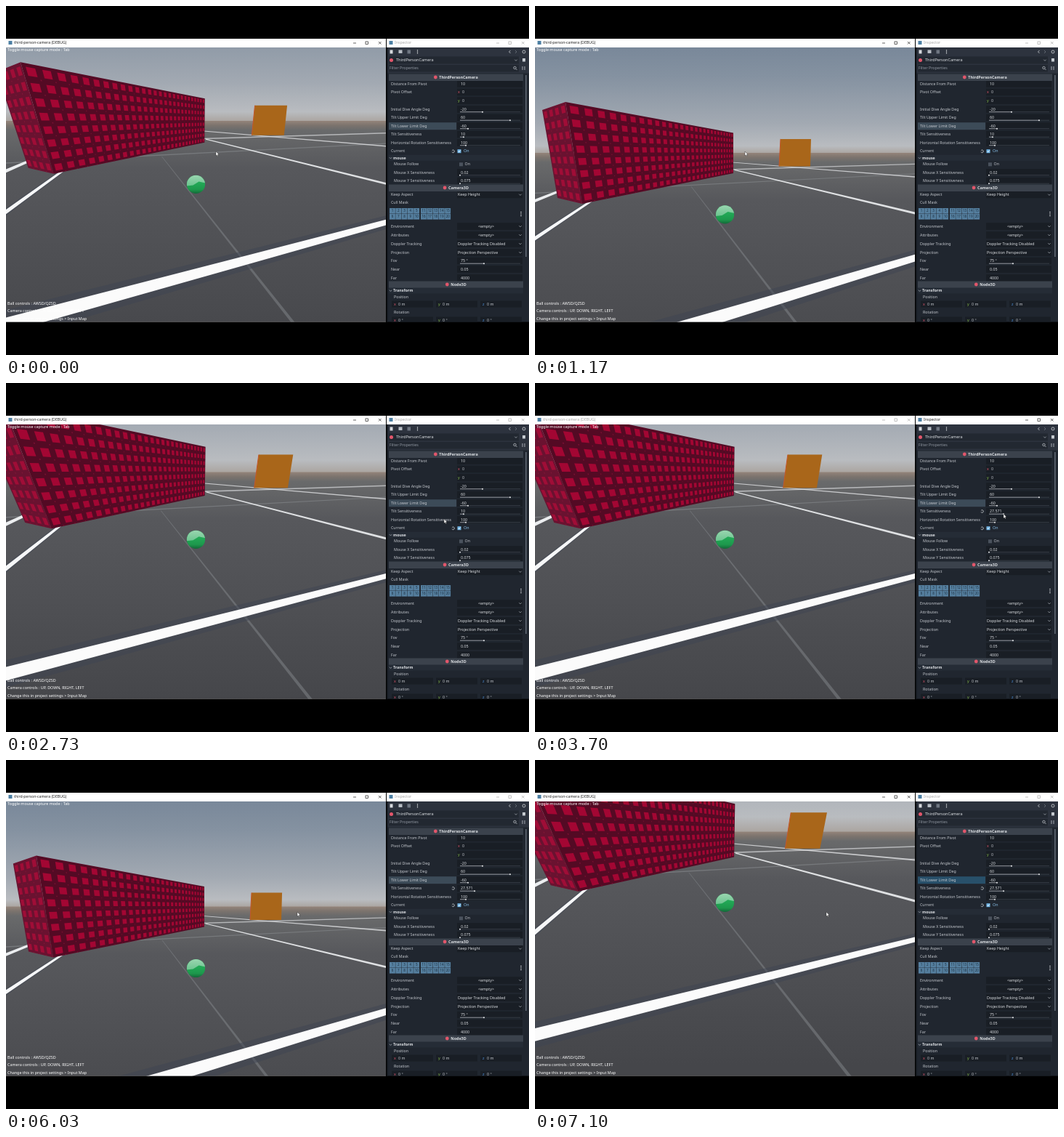
An HTML page with a canvas for the animation above (7.26 s loop, 720 by 480 pixels).

```html
<!DOCTYPE html>
<html>
<head>
<meta charset="utf-8">
<style>
html, body { margin: 0; width: 100%; height: 100%; overflow: hidden; background: #000; }
canvas { display: block; }
</style>
</head>
<body>
<canvas id="stage" width="720" height="480"></canvas>
<script>
const g = document.getElementById('stage').getContext('2d');
const LOOP = 7260, CX = 261.5, CY = 245.5, FOCAL = 245.7, RAD = Math.PI / 180;
const HORIZON = 9.8;          // downward pitch at tilt 0, degrees
const HIGH = 0, LOW = 20.9;   // tilts at which scene points were measured
let tilt = 0;

// [time, ...values] keys, linear in between
const TILT = [[400, 9.6], [930, -2], [1070, -2], [1730, 11.2], [2100, 16.6], [5600, 16.6],
  [6030, 0.15], [6300, -10], [6400, -10], [7080, 20.9]];
const MOUSE = [[2430, 290, 203], [2730, 604, 190], [3030, 629, 182], [3200, 629, 182],
  [3700, 646, 183], [5030, 646, 183], [5470, 402, 212]];
const SENS = [[3230, 10], [3700, 27.571]];

function track(keys, t) {
  if (t <= keys[0][0]) return keys[0].slice(1);
  for (let i = 1; i < keys.length; i++) {
    const a = keys[i - 1], b = keys[i];
    if (t < b[0]) {
      const k = (t - a[0]) / (b[0] - a[0]);
      return a.slice(1).map((v, j) => v + (b[j + 1] - v) * k);
    }
  }
  return keys[keys.length - 1].slice(1);
}

// Screen place of a point seen at (x, y) under tilt ref, for the current tilt
function view([x, y], ref = HIGH) {
  const a = (tilt - ref) * RAD, c = Math.cos(a), s = Math.sin(a), dy = CY - y;
  const k = FOCAL / (FOCAL * c - dy * s);
  return [CX + (x - CX) * k, CY - (dy * c + FOCAL * s) * k];
}
const elevation = e => CY - FOCAL * Math.tan((e + HORIZON + tilt) * RAD);

function trace(pts) {
  pts.forEach(([x, y], i) => i ? g.lineTo(x, y) : g.moveTo(x, y));
  g.closePath();
}
function poly(pts, color) {
  g.beginPath();
  trace(pts);
  g.fillStyle = color;
  g.fill();
}
function strip(ref, x1, y1, w1, x2, y2, w2, color) {
  poly([[x1, y1 - w1 / 2], [x2, y2 - w2 / 2], [x2, y2 + w2 / 2], [x1, y1 + w1 / 2]]
    .map(p => view(p, ref)), color);
}

// Perspective map from the unit square to a quad (clockwise from top left)
function square([a, b, c, d]) {
  const sx = a[0] - b[0] + c[0] - d[0], sy = a[1] - b[1] + c[1] - d[1];
  const x1 = b[0] - c[0], x2 = d[0] - c[0], y1 = b[1] - c[1], y2 = d[1] - c[1];
  const det = x1 * y2 - x2 * y1, p = (sx * y2 - x2 * sy) / det, q = (x1 * sy - sx * y1) / det;
  return (u, v) => {
    const w = p * u + q * v + 1;
    return [0, 1].map(i => ((b[i] - a[i] + p * b[i]) * u + (d[i] - a[i] + q * d[i]) * v + a[i]) / w);
  };
}
function tiledFace(quad, cols, rows, back, front, mark) {
  poly(quad.map(p => view(p)), back);
  const map = square(quad);
  const cells = (lo, hi, color) => {
    g.beginPath();
    for (let i = 0; i < cols; i++) for (let j = 0; j < rows; j++)
      trace([[lo, lo], [hi, lo], [hi, hi], [lo, hi]].map(([u, v]) => view(map((i + u) / cols, (j + v) / rows))));
    g.fillStyle = color;
    g.fill();
  };
  cells(.22, .78, front);
  cells(.92, 1, mark);
}

function text(s, x, y, { size = 5.3, color = '#c3c7cd', weight = 400, align = 'left' } = {}) {
  g.font = `${weight} ${size}px "Noto Sans", "Open Sans", sans-serif`;
  g.textAlign = align;
  g.textBaseline = 'middle';
  g.fillStyle = color;
  g.fillText(s, x, y);
}
function box(x, y, w, h, color) {
  g.fillStyle = color;
  g.fillRect(x, y, w, h);
}
function dot(x, y, r, color) {
  g.beginPath();
  g.arc(x, y, r, 0, 7);
  g.fillStyle = color;
  g.fill();
}
function path(pts, color, width = .8) {
  g.beginPath();
  pts.forEach(([x, y], i) => i ? g.lineTo(x, y) : g.moveTo(x, y));
  g.strokeStyle = color;
  g.lineWidth = width;
  g.stroke();
}
function shade(y1, y2, stops) {
  const grad = g.createLinearGradient(0, y1, 0, y2);
  stops.forEach(([k, c]) => grad.addColorStop(k, c));
  return grad;
}

function scene() {
  g.save();
  g.beginPath();
  g.rect(0, 57, 523, 377.5);
  g.clip();
  const h = elevation(0);
  box(0, 57, 523, 378, shade(elevation(36), h, [[0, '#66788e'], [.5, '#8592a1'], [.8, '#a2a9b2'], [.95, '#b9bcc0'], [1, '#aaa49f']]));
  box(0, h - 1, 523, 440, shade(h - 1, h + 320, [[0, '#94847a'], [.02, '#7b736d'], [.04, '#696a6b'], [.2, '#57585c'], [1, '#45464a']]));

  strip(HIGH, -60, 260.5, 1.4, 620, 226, .9, 'rgba(135,138,142,.6)');
  strip(HIGH, 200, 227, 1.5, 620, 214.5, 1.3, 'rgba(215,217,220,.7)');
  strip(LOW, 250, 113, 1, 640, 148, 2.2, 'rgba(225,227,229,.8)');
  strip(LOW, 276, 128, 1.4, 640, 225, 4, '#dfe1e3');
  strip(HIGH, -60, 292, 6, 45, 250, 3, '#eceef0');
  strip(LOW, -80, 304, 18, 90, 161, 6, 'rgba(66,72,84,.45)');
  strip(LOW, -80, 304, 11, 90, 161, 3.5, '#f6f7f8');
  poly([[211.5, 155], [212.5, 155], [451, 454], [445, 454]].map(p => view(p, LOW)), 'rgba(132,136,140,.5)');
  strip(LOW, -60, 393, 38, 600, 227.7, 14, 'rgba(62,69,82,.5)');
  strip(LOW, -60, 393, 19, 600, 227.7, 5.5, '#fbfbfb');

  tiledFace([[10, 143], [42, 132], [65, 272], [31, 264]], 4, 8, '#6a1230', '#a00d37', '#8e1a3c');
  tiledFace([[42, 132], [273, 174.5], [273, 230], [65, 272]], 27, 8, '#540a24', '#a30633', '#7d1033');

  poly([[338, 183], [380, 183], [379, 220.5], [336, 220.5]].map(p => view(p)), '#a9661a');
  path([[338, 183], [336, 220.5]].map(p => view(p)), '#c4562c', 1);

  ball(...view([CX, 287]));
  const white = { size: 5.4, color: '#fff' };
  text('Toggle mouse capture mode : Tab', 2, 60.5, white);
  text('Ball controls : AWSD/QZSD', 2, 409, white);
  text('Camera controls : UP, DOWN, RIGHT, LEFT', 2, 419.5, white);
  text('Change this in project settings > Input Map', 2, 430, white);
  g.restore();
}

function ball(x, y) {
  g.save();
  dot(x, y, 12.6, shade(y - 2, y + 13, [[0, '#22a856'], [.6, '#1d984c'], [1, '#136437']]));
  g.clip();
  poly([[x - 13, y - 13], [x + 13, y - 13], [x + 13, y - 2], [x + 4, y - 4], [x - 4, y + 1], [x - 13, y + 2]],
    shade(y - 13, y + 2, [[0, '#9bd6b1'], [1, '#6cc48f']]));
  g.restore();
}

function windowBar(x, w, title, active) {
  box(x, 45, w, 12, '#fff');
  const color = active ? '#222' : '#a5a5a5';
  box(x + 3.5, 48, 5, 5, '#4c7fa3');
  text(title, x + 11, 50.8, { size: 5.2, color });
  const r = x + w;
  path([[r - 45, 51], [r - 41, 51]], color, .7);
  g.strokeStyle = color;
  g.strokeRect(r - 28, 49, 3.5, 3.5);
  path([[r - 10, 49], [r - 6.5, 52.5]], color, .7);
  path([[r - 6.5, 49], [r - 10, 52.5]], color, .7);
}

const arrow = (x, y) => path([[x - 1.7, y - .8], [x, y + .9], [x + 1.7, y - .8]], '#b5bac2', .7);
function header(y, name, color) {
  box(527, y - 4.5, 185, 9.5, '#3b424c');
  text(name, 623, y, { size: 5.4, weight: 600, color: '#dfe2e6', align: 'center' });
  dot(623 - g.measureText(name).width / 2 - 5, y, 2.4, color);
}
function field(y, label, value, grab) {
  text(label, 530, y);
  box(621, y - 4.8, 90, 9.6, '#191e25');
  text(value, 626, y, { color: '#dadde1' });
  if (grab) {
    path([[625, y + 3.7], [708, y + 3.7]], '#424a55', .7);
    path([[625, y + 3.7], [grab, y + 3.7]], '#b8bcc2', .7);
    dot(grab, y + 3.7, 1, '#e6e8ea');
  }
}
function choice(y, label, value, center) {
  text(label, 530, y);
  box(621, y - 4.8, 90, 9.6, '#191e25');
  text(value, center ? 661 : 622, y, { color: '#dadde1', align: center ? 'center' : 'left' });
  arrow(708, y);
}
function axes(y) {
  ['x', 'y', 'z'].forEach((n, i) => {
    const x = 531 + i * 61;
    box(x, y - 4.5, 57, 9, '#191e25');
    text(n, x + 3, y, { color: ['#d9556a', '#8bbf4d', '#4d8fd9'][i] });
    text(y < 420 ? '0 m' : '0 °', x + 9, y);
  });
}
function reset(y) {
  g.beginPath();
  g.arc(615.5, y, 1.8, -2.4, 2.6);
  g.strokeStyle = '#d5d8dc';
  g.lineWidth = .8;
  g.stroke();
}

function inspector(t) {
  g.save();
  g.beginPath();
  g.rect(524, 57, 196, 377.5);
  g.clip();
  box(524, 57, 196, 378, '#20262f');
  box(524, 57, 196, 35.5, '#2d333e');
  box(524, 57, 1.5, 378, '#11151a');

  box(528.5, 60.5, 4, 5, '#d7dade');
  box(540.5, 60.5, 5, 4.5, '#b9bec5');
  box(552.5, 60.5, 4.5, 5, '#6f7681');
  [-2, 0, 2].forEach(d => dot(566.5, 63 + d, .7, '#d7dade'));
  path([[694.5, 61], [692.5, 63], [694.5, 65]], '#d0d4d9');
  path([[701, 61], [703, 63], [701, 65]], '#6f7681');
  g.beginPath();
  g.arc(713, 63, 2, 0, 7);
  g.strokeStyle = '#d0d4d9';
  g.stroke();

  box(527, 69.5, 179, 10, '#222831');
  dot(530.5, 74.5, 2.5, '#e2566b');
  text('ThirdPersonCamera', 537, 74.5, { size: 5.5, color: '#dfe2e6' });
  arrow(702, 74.5);
  box(711, 72, 4, 4.5, '#c5cad0');
  box(527, 81, 179, 9.5, '#222831');
  text('Filter Properties', 528, 85.8, { color: '#9299a3' });
  g.beginPath();
  g.arc(700.5, 85, 1.7, 0, 7);
  g.strokeStyle = '#d0d4d9';
  g.stroke();
  path([[702, 86.5], [703.5, 88]], '#d0d4d9');
  path([[711, 83], [711, 88]], '#c5cad0');
  path([[714, 83], [714, 88]], '#c5cad0');
  box(715, 95, 1.8, 250, '#59616c');

  const [sens] = track(SENS, t), changed = sens > 10;
  box(527, 160.2, 93, 10, t > 6400 ? '#28506a' : '#3c4b58');
  field(107, 'Distance From Pivot', '10');
  field(118.5, 'Pivot Offset', '');
  field(130, '', '');
  [118.5, 130].forEach((y, i) => {
    text('xy'[i], 622, y, { color: ['#d9556a', '#8bbf4d'][i] });
    text('0', 628, y);
  });
  field(142, 'Initial Dive Angle Deg', '-20', 656);
  field(153.5, 'Tilt Upper Limit Deg', '60', 694);
  field(165, 'Tilt Lower Limit Deg', '-60', 636);
  field(176.5, 'Tilt Sensitiveness', String(+sens.toFixed(3)), 630 + (sens - 10) * .86);
  field(188, 'Horizontal Rotation Sensitiveness', '100', 633);
  if (changed) reset(176.5);
  text('Current', 530, 199.8);
  reset(199.8);
  box(621.5, 197.2, 5, 5, '#70b5e6');
  path([[622.6, 199.7], [623.7, 201], [625.6, 198.4]], '#fff', .8);
  text('On', 630, 199.8, { color: '#8cc6ef' });
  box(527, 204.8, 185, 8, '#252c36');
  arrow(529.5, 209);
  text('mouse', 533, 209, { weight: 700, color: '#dfe2e6' });
  text('Mouse Follow', 534, 217.8);
  box(624, 215.3, 5, 5, '#4a525d');
  text('On', 631.5, 217.8);
  field(229, '', '0.02', 625);
  field(240.5, '', '0.075', 625);
  text('Mouse X Sensitiveness', 534, 229);
  text('Mouse Y Sensitiveness', 534, 240.5);

  choice(259.5, 'Keep Aspect', 'Keep Height');
  text('Cull Mask', 530, 270.3);
  for (let i = 0; i < 20; i++) {
    const x = 528 + i % 5 * 8.3 + (i > 9 ? 43 : 0), y = 278 + Math.floor(i % 10 / 5) * 8;
    box(x, y, 7.9, 7.6, '#557f9f');
    text(i + 1, x + 4, y + 4, { size: 4.5, color: '#1a2c3d', align: 'center' });
  }
  [-2.5, 0, 2.5].forEach(d => dot(709, 286 + d, .8, '#d7dade'));
  choice(303, 'Environment', '<empty>', true);
  choice(315, 'Attributes', '<empty>', true);
  choice(327, 'Doppler Tracking', 'Doppler Tracking Disabled');
  choice(339, 'Projection', 'Projection Perspective');
  field(350.5, 'Fov', '75 °', 658);
  field(362, 'Near', '0.05');
  field(374, 'Far', '4000');

  header(98, 'ThirdPersonCamera', '#e2566b');
  header(250, 'Camera3D', '#e2566b');
  header(383, 'Node3D', '#e2566b');
  box(527, 387.5, 185, 8, '#252c36');
  arrow(529.5, 391.5);
  text('Transform', 533, 391.5, { weight: 700, color: '#dfe2e6' });
  text('Position', 534, 400);
  axes(410);
  text('Rotation', 534, 421);
  axes(432);
  g.restore();
}

function cursor(x, y) {
  const pts = [[0, -3], [0, 3], [1.4, 1.9], [2.4, 3.8], [3.2, 3.4], [2.4, 1.5], [4, 1.3]]
    .map(([a, b]) => [x - 1 + a, y + b]);
  poly(pts, '#fff');
  path([...pts, pts[0]], '#1b1b1b', .4);
}

function frame(now) {
  const t = now % LOOP, editing = t > 3200 && t < 5400;
  [tilt] = track(TILT, t);
  box(0, 0, 720, 480, '#000');
  scene();
  windowBar(0, 523, 'third-person-camera (DEBUG)', !editing);
  windowBar(524, 196, 'Inspector', editing);
  inspector(t);
  cursor(...track(MOUSE, t));
  requestAnimationFrame(frame);
}
requestAnimationFrame(frame);
</script>
</body>
</html>
```
